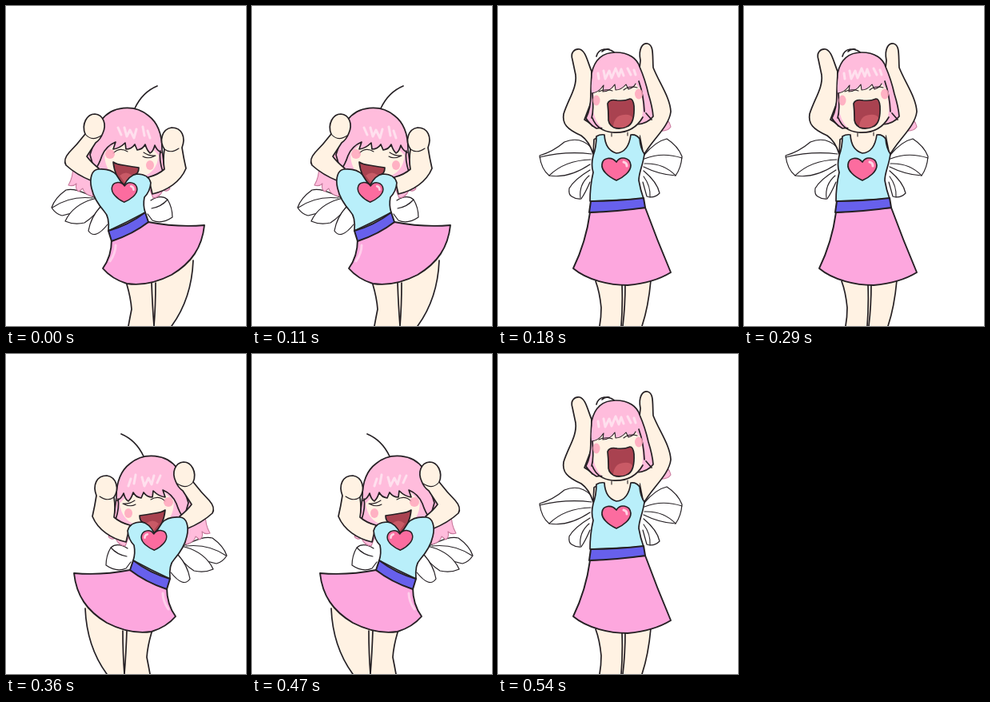
These frames come from a looping animation (300x400 px, 0.72 s). An HTML page:

```html
<!DOCTYPE html>
<html lang="en">
<head>
<meta charset="utf-8">
<title>Dancing fairy</title>
<style>
html, body { margin: 0; width: 100%; height: 100%; overflow: hidden; background: #fff; }
svg { display: block; width: 100%; height: 100%; }
path { fill: none; stroke: #252024; stroke-width: 1.7; stroke-linecap: round; stroke-linejoin: round; }
.skin { fill: #fff2e3; }
.hair { fill: #ffbcdc; }
.wing { fill: #fff; stroke-width: 1.2; }
.top { fill: #b9effa; }
.belt { fill: #6760ec; stroke-width: 2; }
.skirt { fill: #fda7de; stroke-width: 1.9; }
.mouth { fill: #a94250; }
.heart { fill: #fc6c9f; }
.tongue { fill: #c95a66; stroke: none; }
.bare { stroke: none; }
.soft { stroke: #c77a9c; stroke-width: 1.1; }
.thin { stroke-width: 1.1; }
.shine { stroke: #ffe0ee; stroke-width: 3; }
.blush { fill: #ffa6bd; opacity: .85; }
</style>
</head>
<body>
<svg viewBox="0 0 300 400">
  <defs>
    <g id="heart">
      <path class="heart" d="M0 15C-11 10-19 2-18-5C-17-14-6-15 0-8C5-16 17-14 18-4C18 4 9 11 0 15Z"/>
      <path d="M9-8Q13-7 13-3" style="stroke:#ffd3e3;stroke-width:3"/>
    </g>
  </defs>

  <g id="sway">
    <path d="M161 128C167 115 177 105 189 100"/>
    <!-- wings -->
    <path class="wing" d="M112 240C98 234 86 227 75 230Q61 240 57 252Q62 260 70 262Q92 258 112 240"/>
    <path class="wing" d="M110 241C92 246 80 256 74 269Q85 274 98 271Q112 262 119 249"/>
    <path class="wing" d="M118 251Q106 264 103 281Q111 293 127 273"/>
    <path class="wing thin" d="M108 240Q80 237 58 252"/>
    <path class="wing" d="M181 243Q194 235 202 242Q208 252 208 264Q195 273 183 268L177 260M182 253Q194 251 202 242"/>
    <!-- hair behind -->
    <path class="hair soft" d="M84 199Q84 214 78 224Q84 226 88 222Q86 229 91 232L96 228Q97 235 108 238L119 205L130 160Z"/>
    <path class="hair soft" d="M190 205L205 228Q202 233 196 230Q193 239 184 240L176 220Z"/>
    <!-- legs -->
    <path class="skin bare" d="M151 346L157 379L153 400H184L187 345H183L185 400H206C222 378 232 350 234 314Z"/>
    <path d="M151 348Q156 365 157 379Q155 389 153 400M182 346Q183 375 185 400M187 346Q187 375 185 400M234 318Q232 366 207 400"/>
    <!-- head -->
    <path class="hair" d="M119 143C132 125 160 122 178 137C190 146 195 161 195 179L199 210L182 217L111 207L105 186Z"/>
    <path class="skin bare" d="M124 176Q121 196 130 207L148 222L171 213Q188 208 191 187L174 169L146 165Z"/>
    <path class="hair bare" d="M116 163C122 138 145 129 163 132C181 137 194 153 194 183Q188 180 186 174Q184 182 180 184Q176 180 174 173Q171 179 164 180L161 173Q157 179 150 179L149 171Q142 178 134 179L137 170Q130 180 121 183Z"/>
    <path d="M194 183Q188 180 186 174Q184 182 180 184Q176 180 174 173Q171 179 164 180L161 173Q157 179 150 179L149 171Q142 178 134 179L137 170Q125 175 120 187Q116 199 111 205M193 181Q191 192 196 207"/>
    <path class="shine" d="M140 152L144 161M148 152L151 163L155 155L160 165L163 154M171 151L173 162M177 156L180 165"/>
    <path class="thin" d="M134 184Q142 176 152 182M171 188Q178 192 187 187M172 183Q179 188 187 187"/>
    <ellipse class="blush" cx="130" cy="185" rx="6" ry="6"/>
    <ellipse class="blush" cx="180" cy="199" rx="5" ry="6"/>
    <path class="mouth" d="M134 195Q138 198 147 199Q158 201 166 202Q166 210 160 211Q157 221 148 224Q136 215 134 195Z"/>
    <path class="tongue" d="M142 212Q150 205 158 212L150 223Z"/>
    <!-- arms -->
    <path class="skin" d="M99 160C94 148 101 135 111 135C122 136 126 148 121 159Q118 167 112 171L101 188Q106 195 116 203L108 219Q88 211 75 199Q71 192 79 183Q89 173 99 160Z"/>
    <path class="skin" d="M198 179C191 168 195 154 207 152C220 152 225 164 220 177Q222 190 225 203C218 220 201 231 183 235L178 214Q190 211 198 204Q196 192 198 179Z"/>
    <path class="thin" d="M99 160Q107 170 119 162M198 179Q206 185 216 178"/>
    <!-- dress -->
    <path class="top" d="M107 228C104 216 107 204 116 204Q131 203 138 211L147 225Q154 211 164 210Q178 210 181 221Q180 232 173 239Q171 249 174 258Q152 270 128 281C129 270 128 262 123 257Q110 242 107 228Z"/>
    <path class="skirt" d="M132 292Q158 284 178 270Q214 277 248 274C245 302 232 321 207 336Q178 351 151 347Q132 341 121 328Q132 313 132 292Z"/>
    <path class="belt" d="M128 281Q153 274 174 258L178 270Q159 285 132 294Z"/>
    <path d="M137 299Q137 309 130 319" style="stroke:#ffd0ec;stroke-width:3"/>
    <use href="#heart" transform="translate(148 232) rotate(2) scale(.88)"/>
  </g>

  <g id="cheer">
    <path d="M123 63Q125 55 133 54Q143 54 147 60M130 57Q134 53 139 54"/>
    <!-- wings -->
    <path class="wing" d="M117 177C107 167 95 165 83 170Q69 182 52 187Q54 204 64 212Q88 216 115 198"/>
    <path class="wing" d="M115 205Q95 217 89 228Q88 236 92 238Q98 242 104 241Q109 234 115 220"/>
    <path class="wing thin" d="M117 185Q85 181 52 189M116 192Q83 193 64 212M114 212Q101 223 103 240"/>
    <path class="wing" d="M182 187Q197 169 211 166Q225 175 230 188Q229 202 222 212Q202 211 182 201"/>
    <path class="wing" d="M182 206Q199 220 202 234Q195 241 186 238L181 220"/>
    <path class="wing thin" d="M183 191Q205 182 230 190M183 197Q207 196 222 212M182 213Q191 225 190 239"/>
    <path class="hair soft" d="M204 139Q214 141 216 151Q212 157 202 156Z"/>
    <!-- legs -->
    <path class="skin bare" d="M122 342Q132 370 127 400H181Q190 375 191 338Z"/>
    <path d="M122 344Q127 357 129 377Q129 389 127 400M155 348Q156 375 154 400M159 348Q159 375 156 400M191 343Q188 376 180 400"/>
    <!-- arms and chest -->
    <path class="skin bare" d="M119 157L178 154L181 191L118 194Z"/>
    <path class="skin" d="M93 67C90 58 96 53 102 54C109 56 111 66 117 82L116 121L108 142L133 158L120 167L119 185Q114 169 104 162C86 154 80 147 82 135C88 116 99 102 97 86Z"/>
    <path class="skin" d="M178 68C175 53 181 46 187 47C195 49 193 62 194 77C202 97 215 114 216 132C214 151 191 169 182 187L177 162L161 157L181 139L175 96Z"/>
    <path class="skin bare" d="M124 150L176 145L178 180L120 180Z"/>
    <!-- head -->
    <path class="hair" d="M117 84C121 66 132 58 147 58C164 58 174 66 177 76Q184 92 188 110Q193 126 194 138Q187 147 174 148L123 153Q113 147 110 140Q116 129 116 110Z"/>
    <path class="skin bare" d="M120 98L119 130Q123 155 144 158Q169 160 179 143Q184 126 176 94Z"/>
    <path class="hair bare" d="M117 109C115 83 126 63 147 61C167 60 179 81 177 103L172 97Q170 102 163 104L160 98Q154 105 147 105L146 98Q140 107 131 107L132 99Q125 108 117 109Z"/>
    <path class="thin" d="M118 109Q126 108 132 99L131 107Q140 107 146 98L147 105Q154 105 160 98L163 104Q170 102 172 97"/>
    <path d="M176 94Q182 111 183 132M118 109Q120 130 117 140M110 141L118 150M185 134L192 142"/>
    <path d="M118 140Q124 156 143 158Q169 160 181 139"/>
    <path class="shine" d="M125 84L126 91M132 81L134 91L139 81L142 90L147 78L151 88L154 79L157 87M162 78L166 86M170 80L172 86"/>
    <path class="thin" d="M126 107Q134 103 143 106M157 105Q164 99 174 102"/>
    <ellipse class="blush" cx="123" cy="118" rx="4.5" ry="6.5"/>
    <ellipse class="blush" cx="176" cy="110" rx="5" ry="6.5"/>
    <path class="mouth" d="M137 122Q139 116 149 118Q158 119 165 116Q169 116 170 125Q171 145 163 150Q153 155 145 152Q137 148 138 139Q138 131 137 122Z"/>
    <path class="tongue" d="M144 151Q145 137 157 136Q166 135 168 140Q165 150 156 152Z"/>
    <path class="thin" d="M142 159V163M162 158V162"/>
    <!-- dress -->
    <path class="top" d="M123 163Q128 160 133 161Q134 180 148 184Q163 183 166 161Q173 160 177 166Q178 178 183 185C181 200 176 208 176 218Q178 230 182 241L115 244Q115 225 119 208Q116 199 119 187Q123 176 123 163Z"/>
    <path class="skirt" d="M115 258L184 252Q199 293 216 333Q195 346 162 349C140 349 112 343 94 328Q110 295 115 258Z"/>
    <path class="belt" d="M116 244Q148 244 182 240L184 252Q149 257 114 258Z"/>
    <use href="#heart" transform="translate(148 203)"/>
  </g>
</svg>
<script>
const sway = document.getElementById("sway");
const cheer = document.getElementById("cheer");
const show = (el, on) => el.setAttribute("visibility", on ? "visible" : "hidden");

function draw() {
  const pose = Math.floor(performance.now() % 720 / 180);
  show(cheer, pose % 2 === 1);
  show(sway, pose % 2 === 0);
  sway.setAttribute("transform", pose === 2 ? "translate(333) scale(-1 1)" : "");
  requestAnimationFrame(draw);
}
draw();
</script>
</body>
</html>
```
